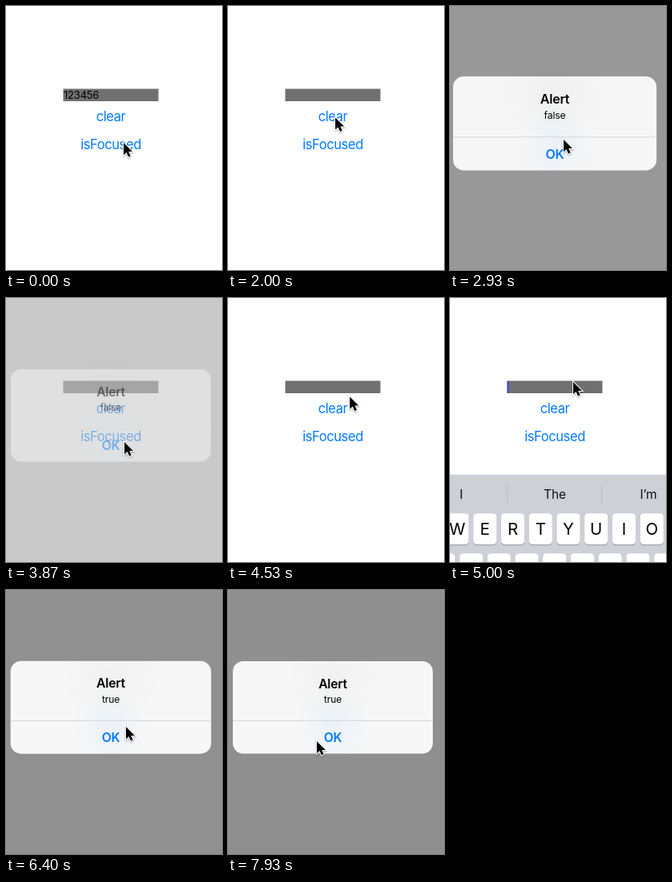
Animation, 270 px wide and 330 px high, one loop 8000 ms. Source, as an HTML page with a canvas:

```html
<!DOCTYPE html>
<html>
<head>
<meta charset="utf-8">
<style>
html, body { margin: 0; overflow: hidden; background: #fff; }
canvas { display: block; }
</style>
</head>
<body>
<canvas id="stage" width="270" height="330"></canvas>
<script>
const ctx = document.getElementById('stage').getContext('2d');
const LOOP = 8000;
const BLUE = '#007aff';

// time, x, y of the pointer tip; eased between entries
const POINTER = [
  [0, 147, 171], [30, 147, 171], [470, 134, 139], [1960, 134, 139],
  [2530, 142, 167], [3420, 142, 167], [3600, 148, 180], [4410, 148, 180],
  [4620, 155, 88], [4740, 154, 105], [5280, 154, 105], [5900, 150, 171],
  [6880, 150, 171], [7070, 111, 202], [7820, 111, 202], [7920, 111, 189],
  [LOOP, 111, 189]
];

const clamp = v => Math.max(0, Math.min(1, v));
const smooth = v => v * v * (3 - 2 * v);
const ramp = (t, from, to) => clamp((t - from) / (to - from));

// Remaining fraction of a critically damped spring released at `start`
function settle(t, start, rate) {
  const u = Math.max(0, t - start) / 1000 * rate;
  return (1 + u) * Math.exp(-u);
}

const press = (t, start) =>
  1 - 0.6 * ramp(t, start, start + 90) * (1 - ramp(t, start + 110, start + 270));

function text(str, x, y, size, { color = '#000', weight = 400, spacing = 0, align = 'center' } = {}) {
  ctx.font = `${weight} ${size}px Inter, sans-serif`;
  ctx.letterSpacing = spacing + 'px';
  ctx.textAlign = align;
  ctx.fillStyle = color;
  ctx.fillText(str, x, y);
}

function rect(x, y, w, h, color, radius = 0) {
  ctx.fillStyle = color;
  ctx.beginPath();
  ctx.roundRect(x, y, w, h, radius);
  ctx.fill();
}

function glow(x, y, radius, rgb, alpha) {
  const g = ctx.createRadialGradient(x, y, 0, x, y, radius);
  g.addColorStop(0, `rgba(${rgb},${alpha})`);
  g.addColorStop(1, `rgba(${rgb},0)`);
  ctx.fillStyle = g;
  ctx.fillRect(x - radius, y - radius, radius * 2, radius * 2);
}

function button(label, y, alpha) {
  ctx.globalAlpha = alpha;
  text(label, 131, y, 16.6, { color: BLUE, spacing: -0.45 });
  ctx.globalAlpha = 1;
}

function form(t) {
  rect(71.5, 103.5, 119, 15.5, '#707070');
  if (t < 860) text('123456', 72, 116, 13, { spacing: -0.2, align: 'left' });
  if (t > 4745 && t < 6250) {
    ctx.globalAlpha = 1 - ramp(t, 5320, 5450) + ramp(t, 5780, 5900);
    rect(71.5, 104, 2, 14.5, '#4340d8');
    ctx.globalAlpha = 1;
  }
  button('clear', 143.5, press(t, 790));
  button('isFocused', 178.5, Math.min(press(t, 2770), press(t, 6170)));
}

function alertBox(message, t, showAt, hideAt) {
  if (t < showAt) return;
  const opening = settle(t, showAt, 30);
  const closing = t > hideAt ? settle(t, hideAt, 18) : 1;
  rect(0, 0, 270, 330, `rgba(0,0,0,${0.44 * (1 - opening) * closing})`);

  const scale = 1 + 0.2 * opening;
  ctx.save();
  ctx.globalAlpha = (1 - opening * opening) * closing;
  ctx.translate(131, 146.8);
  ctx.scale(scale, scale);
  ctx.translate(-131, -146.8);
  rect(6, 89, 250, 115.5, '#f7f7f7', 13);
  glow(131, 110, 62, '120,120,120', 0.05);
  ctx.save();
  ctx.beginPath();
  ctx.rect(6, 89, 250, 115);
  ctx.clip();
  glow(131, 172, 50, '200,228,255', 0.25);
  ctx.restore();
  rect(6, 163, 250, 1, '#d6d6d9');
  text('Alert', 131, 122.5, 15.75, { weight: 600, spacing: -0.25 });
  text(message, 131, 141, 12, { spacing: -0.1 });
  text('OK', 131, 190, 15.75, { color: BLUE, weight: 600, spacing: -0.25 });
  ctx.restore();
}

function keyRow(letters, firstX, y) {
  [...letters].forEach((letter, i) => {
    const x = firstX + i * 34.75;
    rect(x - 14.6, y + 1, 29.2, 39, '#8a8d93', 4.6);
    rect(x - 14.6, y, 29.2, 39, '#fff', 4.6);
    text(letter, x, y + 27.3, 20.5);
  });
}

function keyboard(t) {
  if (t < 4745 || t > 6900) return;
  const offset = t < 6200 ? settle(t, 4745, 22) : 1 - settle(t, 6200, 22);
  ctx.save();
  ctx.translate(0, 260 * offset);
  rect(0, 214.5, 270, 280, '#cdd0d7');
  ['I', 'The', 'I’m'].forEach((word, i) =>
    text(word, 14 + i * 117, 245, 15.6, { spacing: -0.2, color: '#111' }));
  rect(71, 228, 1, 23, '#b7bac1');
  rect(189, 228, 1, 23, '#b7bac1');
  keyRow('WERTYUIO', 9, 263);
  keyRow('ASDFGHJKL', -8.3, 313);
  ctx.restore();
}

function pointer(t) {
  const i = POINTER.findIndex(p => p[0] > t);
  const [t0, x0, y0] = POINTER[i - 1], [t1, x1, y1] = POINTER[i];
  const k = smooth(ramp(t, t0, t1));
  ctx.save();
  ctx.translate(x0 + (x1 - x0) * k, y0 + (y1 - y0) * k);
  const arrow = new Path2D('M0 0V15.2L3.5 12L6 17.6L8.7 16.4L6.2 11H11Z');
  ctx.lineWidth = 2;
  ctx.strokeStyle = '#fff';
  ctx.shadowColor = 'rgba(0,0,0,.35)';
  ctx.shadowBlur = 2;
  ctx.shadowOffsetY = 1;
  ctx.stroke(arrow);
  ctx.shadowColor = 'transparent';
  ctx.fillStyle = '#000';
  ctx.fill(arrow);
  ctx.restore();
}

function draw() {
  const t = performance.now() % LOOP;
  rect(0, 0, 270, 330, '#fff');
  form(t);
  if (t < 4500) alertBox('false', t, 2795, 3775);
  alertBox('true', t, 6195, LOOP);
  keyboard(t);
  pointer(t);
  requestAnimationFrame(draw);
}
draw();
</script>
</body>
</html>
```
